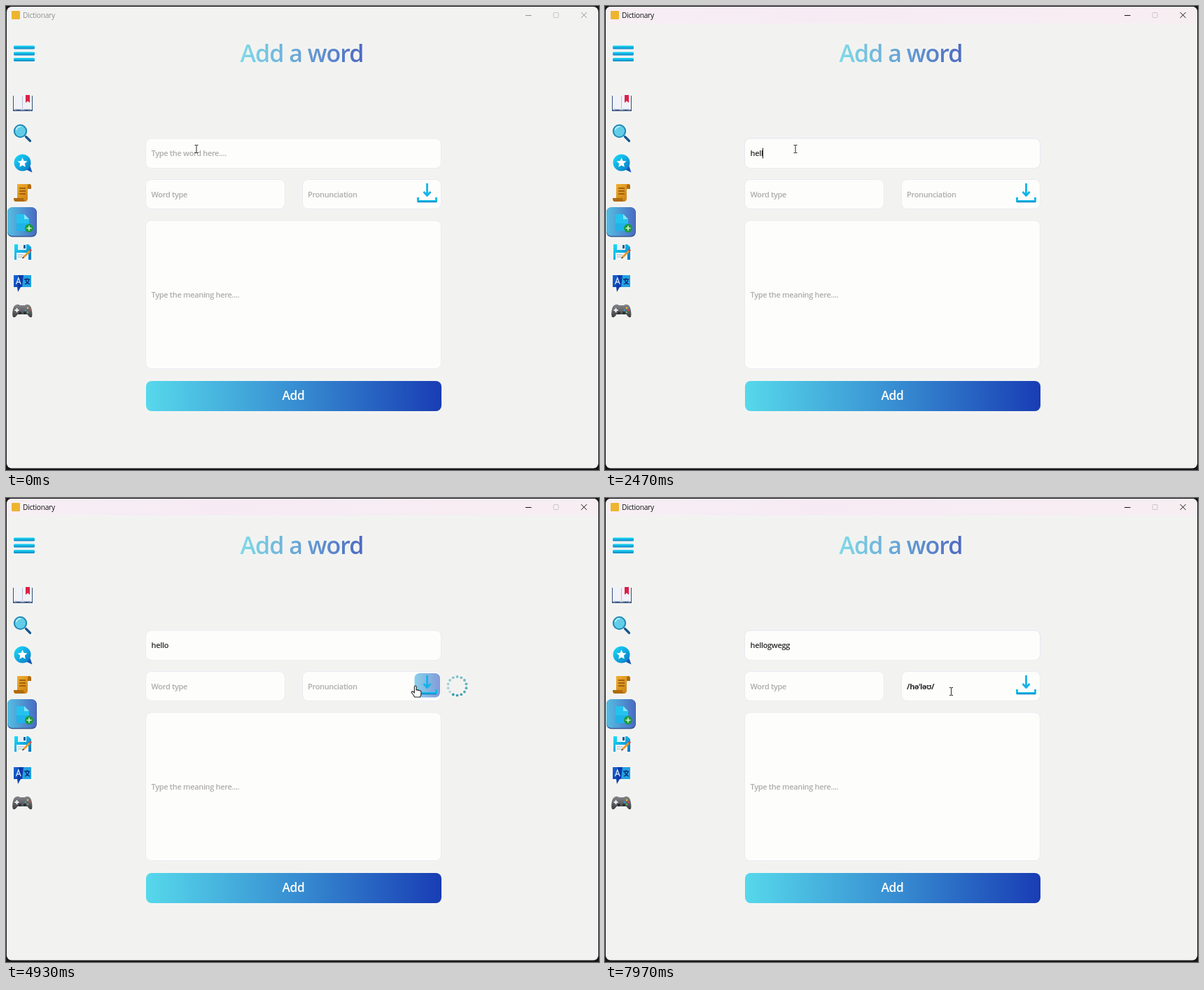
An HTML page for the animation above (8000 ms loop, 847 by 662 pixels).

```html
<!DOCTYPE html>
<html lang="en">
<head>
<meta charset="utf-8">
<title>Dictionary</title>
<style>
html, body { margin: 0; width: 100%; height: 100%; overflow: hidden; background: #18181b; }
svg { display: block; width: 847px; height: 662px; }
text { font-family: "Open Sans", "Noto Sans", sans-serif; font-weight: 600; white-space: pre; }
.field { fill: #fdfdfc; stroke: #e9ebf0; stroke-width: 1; }
.hint, .value { font-size: 11px; letter-spacing: -.33px; }
.hint { fill: #adaca9; }
.value { fill: #2d2b2c; }
.ipa { font-family: "Noto Sans", sans-serif; }
</style>
</head>
<body>
<svg viewBox="0 0 847 662" xmlns="http://www.w3.org/2000/svg">
  <defs>
    <linearGradient id="sky" x2="1" y2="1"><stop stop-color="#18e0fb"/><stop offset="1" stop-color="#0a74c4"/></linearGradient>
    <linearGradient id="bar" x2="0" y2="1"><stop stop-color="#1ddcf8"/><stop offset="1" stop-color="#0b85c6"/></linearGradient>
    <linearGradient id="navy" x2="1" y2="1"><stop stop-color="#1767d8"/><stop offset="1" stop-color="#0a2a96"/></linearGradient>
    <linearGradient id="gold" x2="1" y2="1"><stop stop-color="#f6b432"/><stop offset="1" stop-color="#c77a10"/></linearGradient>
    <linearGradient id="pad" x2="0" y2="1"><stop stop-color="#85878b"/><stop offset="1" stop-color="#3b3d41"/></linearGradient>
    <linearGradient id="button"><stop stop-color="#56d8eb"/><stop offset=".5" stop-color="#388fd2"/><stop offset="1" stop-color="#193db4"/></linearGradient>
    <linearGradient id="heading"><stop stop-color="#80dbe8"/><stop offset="1" stop-color="#4d69c2"/></linearGradient>
    <linearGradient id="chosen"><stop stop-color="#55bfe2"/><stop offset="1" stop-color="#496bc3"/></linearGradient>
    <linearGradient id="hover"><stop stop-color="#8ad0ec"/><stop offset="1" stop-color="#839bd8"/></linearGradient>
    <linearGradient id="caption"><stop stop-color="#f7eff4"/><stop offset=".35" stop-color="#f6ebf4"/><stop offset="1" stop-color="#f7eef2"/></linearGradient>
    <clipPath id="frame"><rect x="1" y="1" width="845" height="658.5" rx="7"/></clipPath>
  </defs>

  <rect width="847" height="662" fill="#18181b"/>
  <g clip-path="url(#frame)">
    <rect width="847" height="662" fill="#f2f3f1"/>
    <rect id="caption-bar" width="847" height="25" fill="url(#caption)"/>
  </g>

  <rect x="8" y="7" width="12" height="12" rx="1" fill="#edb52f"/>
  <g id="chrome">
    <text x="24" y="17" font-size="10.3" letter-spacing="-.3" style="font-weight:400">Dictionary</text>
    <g fill="none" stroke="currentColor">
      <path d="M742 13.5h8.500M821.500 9l8 8m0-8l-8 8"/>
      <rect x="782" y="9.500" width="7" height="7" rx="1" stroke="#c9c5c9"/>
    </g>
  </g>

  <g fill="url(#bar)">
    <rect x="11" y="56.500" width="30" height="5" rx="1.500"/>
    <rect x="11" y="65.500" width="30" height="5" rx="1.500"/>
    <rect x="11" y="74" width="30" height="5" rx="1.500"/>
  </g>

  <g id="book">
    <path d="M10 128h28v22H10z" fill="#34507c"/>
    <path d="M11 127q7-2 12.500 1v20q-6-2-12.500 0zM37 127q-7-2-13.500 1v20q6-2 13.500 0z" fill="#f0f2f8"/>
    <path d="M23.500 128v20M12 148.500q6-2 11.500 0q6-2 12.500 0" fill="none" stroke="#b9c3d6"/>
    <path d="M28 127h6v11l-3-2.500-3 2.500z" fill="#dc1f45"/>
  </g>

  <g id="lens">
    <path d="M28.500 186.500l6 6" stroke="#17558c" stroke-width="3.200" stroke-linecap="round"/>
    <circle cx="20.500" cy="178.500" r="8.700" fill="#62cde9" stroke="#2188b5" stroke-width="2"/>
    <path d="M14.500 177a6.500 6.500 0 0 1 7-5" fill="none" stroke="#b5effa" stroke-width="2"/>
  </g>

  <g id="favourite">
    <path d="M28 233l9.500 4.500-3-9z" fill="#1557b8"/>
    <circle cx="23.500" cy="223.500" r="12" fill="url(#sky)"/>
    <path d="M23.500 216.500l2 4.500 5 .5-3.700 3.300 1 4.900-4.300-2.500-4.300 2.500 1-4.900-3.700-3.300 5-.5z" fill="#fff"/>
  </g>

  <g id="scroll">
    <path d="M16 254h17q3 0 3 4v3h-5v13q0 5-4 5H14q-3 0-3-5h5z" fill="url(#gold)"/>
    <path d="M31 261v-4q0-3 2.500-3t2.500 4v3zM11 274h14q0 5 3 5H14q-3 0-3-5z" fill="#b06a0c"/>
    <path d="M19 260h9m-9 4h9m-9 4h9" stroke="#8d500a" stroke-width="1.300"/>
  </g>

  <g id="add-tab">
    <rect x="2" y="287.500" width="42" height="42" rx="7" fill="#34558f"/>
    <rect x="2" y="287" width="41.500" height="41" rx="7" fill="url(#chosen)"/>
    <path d="M15 297h11l7 7v17H15z" fill="#24c3ef"/>
    <path d="M26 297l7 7h-7z" fill="#86e4fa"/>
    <path d="M15 310h18v11H15z" fill="#1a9fdf" opacity=".45"/>
    <circle cx="33" cy="317" r="6" fill="#1d9a3a"/>
    <path d="M29.500 317h7m-3.500-3.500v7" stroke="#d8f5dc" stroke-width="1.600"/>
  </g>

  <g id="save">
    <path d="M12 340h20l4 4v18H12z" fill="url(#sky)"/>
    <path d="M17 340h12v8H17z" fill="#e8f1f8"/>
    <path d="M25 341h3v5h-3z" fill="#285a92"/>
    <path d="M15 352h17v10H15z" fill="#f4f6f8"/>
    <path d="M17 355h8m-8 3h6" stroke="#9bb3c9"/>
    <path d="M25 358.500l9-9" stroke="#e7992b" stroke-width="3"/>
    <path d="M34 349.500l2-2" stroke="#d34450" stroke-width="3"/>
    <path d="M23 360.500l1-3 2 2z" fill="#403629"/>
  </g>

  <g id="translate">
    <path d="M11 384h14v17h-4l-4 7-1-7h-5z" fill="url(#navy)"/>
    <path d="M23 384h13v17H23z" fill="#20a3e2"/>
    <path d="M25 384l-2 17h-6l1-17z" fill="#1039a8"/>
    <path d="M14.500 397l3.300-9 3.300 9m-5.500-3h4.400" fill="none" stroke="#cfeaff" stroke-width="1.300"/>
    <path d="M26 390h8m-4-2v2m-3 7q5-2 6-7m-5 0q1 5 6 7" fill="none" stroke="#0b2c7a" stroke-width="1.300"/>
  </g>

  <g id="gamepad">
    <path d="M15 426q3-1 5 1h7q2-2 5-1q4 1 5 9t-.5 9q-3 1-6-4h-14q-3 5-6 4q-2-1-1-9t5.500-9z" fill="url(#pad)"/>
    <path d="M12.500 434h6m-3-3v6" stroke="#eceef0" stroke-width="2"/>
    <g>
      <circle cx="31" cy="431" r="1.300" fill="#e9c23c"/><circle cx="34" cy="434" r="1.300" fill="#d9483f"/>
      <circle cx="31" cy="437" r="1.300" fill="#51b562"/><circle cx="28" cy="434" r="1.300" fill="#3f96d8"/>
    </g>
    <circle cx="20" cy="438" r="2" fill="#2b2d30"/><circle cx="27" cy="438" r="2" fill="#2b2d30"/>
  </g>

  <text x="334.500" y="80" font-size="34" letter-spacing="-1" fill="url(#heading)">Add a word</text>

  <rect id="halo" x="198.500" y="188" width="424" height="44" rx="9" fill="#e6e9f1"/>
  <rect class="field" x="199.500" y="189" width="422" height="42.500" rx="8"/>
  <rect class="field" x="199.500" y="247.500" width="199" height="42" rx="8"/>
  <rect class="field" x="423.500" y="247.500" width="198" height="42" rx="8"/>
  <rect class="field" x="199.500" y="306" width="422" height="211.500" rx="8"/>
  <text id="word" x="207.500" y="213.500"></text>
  <text class="hint" x="207.500" y="272.500">Word type</text>
  <text id="sound" x="431" y="272.500"></text>
  <text class="hint" x="207.500" y="415.500">Type the meaning here....</text>
  <rect id="caret" y="202.500" width="1" height="15" fill="#222"/>

  <rect id="glow" x="583.500" y="250" width="36.500" height="34.500" rx="7" fill="url(#hover)"/>
  <g fill="none" stroke-linejoin="round">
    <path d="M601.500 253v17m-5-5l5 5.500 5-5.500" stroke="#13b4e8" stroke-width="2.800"/>
    <path d="M588.500 273v5.500h26V273" stroke="#12bdea" stroke-width="3"/>
    <path d="M588 279.500h27" stroke="#0b86c4" stroke-width="1.500"/>
  </g>

  <rect x="200" y="535" width="422" height="43" rx="8" fill="url(#button)"/>
  <text x="410.500" y="562" font-size="17.300" letter-spacing="-.3" fill="#fff" text-anchor="middle">Add</text>

  <g id="spinner" fill="#2a99ac"></g>

  <g id="pointer">
    <path id="beam" d="M-2.500-5.500h2l.5.500.5-.5h2M-2.500 5.500h2l.5-.5.5.5h2M0-5V5" fill="none" stroke="#2b2b2b"/>
    <path id="hand" d="M-1.200 1.500Q-1.200 0 .2 0T1.600 1.500V6q1.600-.9 2.500.4 1.500-.6 2.300.6 2-.3 2 1.700v3q0 2-1.500 4.300H-.8Q-2 13.500-5 10q-1-1.600.5-2.100 1.500 0 3.300 2z" fill="#fff" stroke="#222" stroke-width="1.100"/>
    <path id="arrow" d="M0 0v14l3.200-3 2.300 5 2.200-1-2.300-4.800H10z" fill="#fff" stroke="#222"/>
  </g>
</svg>
<script>
const LOOP = 8000;
const $ = id => document.getElementById(id);
const show = (id, on) => $(id).setAttribute("visibility", on ? "visible" : "hidden");
const clamp = v => Math.max(0, Math.min(1, v));
const ease = v => v * v * (3 - 2 * v);

const keys = [
  [1530, "h"], [1770, "e"], [2030, "l"], [2170, "l"], [2530, "o"],
  [6800, "g"], [6930, "w"], [7030, "e"], [7150, "g"], [7270, "g"]
];
const focus = [[870, 4400], [6150, LOOP]];
const path = [ // time, x, y
  [0, 272, 204], [3520, 272, 204], [4200, 611, 276], [4560, 611, 276],
  [4900, 584.5, 268], [5650, 584.5, 268], [6100, 246.5, 204],
  [7350, 246.5, 204], [7850, 494.5, 276], [LOOP, 494.5, 276]
];
const fields = [[199, 189, 622, 231], [199, 247, 399, 290], [423, 247, 622, 290], [199, 306, 622, 518]];
const download = [584, 250, 620, 285];
const loading = [4450, 5500];

const DOTS = 14;
const dots = Array.from({ length: DOTS }, (_, i) => {
  const dot = document.createElementNS("http://www.w3.org/2000/svg", "circle");
  const a = i / DOTS * 2 * Math.PI;
  dot.setAttribute("cx", 644.5 + 13.3 * Math.sin(a));
  dot.setAttribute("cy", 268.3 - 13.3 * Math.cos(a));
  dot.setAttribute("r", 1.9);
  $("spinner").append(dot);
  return dot;
});

function setText(id, value, hint, extra = "") {
  const el = $(id);
  const text = value || hint;
  if (el.textContent !== text) el.textContent = text;
  el.setAttribute("class", value ? "value " + extra : "hint");
}

function pointerAt(t) {
  const i = Math.max(1, path.findIndex(p => p[0] > t));
  const [t0, x0, y0] = path[i - 1], [t1, x1, y1] = path[i];
  const k = ease(clamp((t - t0) / (t1 - t0)));
  return [x0 + (x1 - x0) * k, y0 + (y1 - y0) * k];
}

function drawPointer(t) {
  const [x, y] = pointerAt(t);
  const inside = ([l, top, r, b]) => x >= l && x <= r && y >= top && y <= b;
  const hand = inside(download);
  const beam = !hand && fields.some(inside);
  $("pointer").setAttribute("transform", `translate(${x} ${y})`);
  show("hand", hand);
  show("beam", beam);
  show("arrow", !hand && !beam);
  show("glow", hand);
}

function drawWord(t) {
  const typed = keys.filter(k => k[0] <= t);
  const word = typed.map(k => k[1]).join("");
  setText("word", word, "Type the word here....");
  const span = focus.find(([a, b]) => t >= a && t < b);
  show("halo", span);
  const last = span ? Math.max(span[0], typed.length ? typed[typed.length - 1][0] : 0) : 0;
  show("caret", span && (t - last) % 1000 < 500);
  const width = word ? $("word").getComputedTextLength() : 0;
  $("caret").setAttribute("x", 207 + Math.round(width));
}

function draw(t) {
  const active = clamp((t - 870) / 130);
  const shade = Math.round(145 - 125 * active);
  const ink = `rgb(${shade},${shade},${shade})`;
  $("caption-bar").setAttribute("opacity", active);
  $("chrome").setAttribute("fill", ink);
  $("chrome").setAttribute("color", ink);

  drawWord(t);
  setText("sound", t >= loading[1] ? "/həˈləʊ/" : "", "Pronunciation", "ipa");
  show("spinner", t >= loading[0] && t < loading[1]);
  const head = (t - loading[0]) / 1000 + .1;
  dots.forEach((dot, i) => {
    const lag = (((head - i / DOTS) % 1) + 1) % 1;
    dot.setAttribute("opacity", 1 - .75 * lag);
  });
  drawPointer(t);
}

function tick() {
  draw(performance.now() % LOOP);
  requestAnimationFrame(tick);
}
tick();
</script>
</body>
</html>
```
